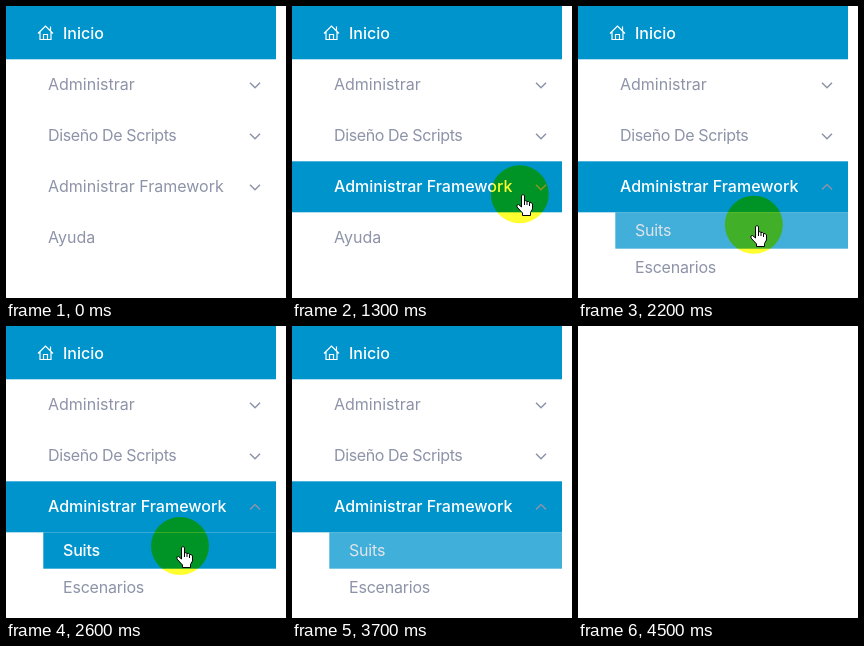
An HTML page that plays this animation: 280x292 px, repeating every 4600 ms.

```html
<!DOCTYPE html>
<html lang="es">
<head>
<meta charset="utf-8">
<style>
  html, body { margin: 0; width: 100%; height: 100%; overflow: hidden; background: #fff; }
  svg { display: block; width: 280px; height: 292px; }
  text { font: 16px Inter, "Open Sans", sans-serif; fill: #8d93a8; }
  .head { font-weight: 500; fill: #fff; }
  .tight { letter-spacing: -.38px; }
  #sub text { letter-spacing: -.2px; }
  .line { fill: none; stroke: #8d93a8; stroke-width: 1.5; }
  .blue { fill: #0094cd; }
  #spot { fill: #ffff30; mix-blend-mode: multiply; }
</style>
</head>
<body>
<svg viewBox="0 0 280 292" id="stage">
  <rect width="280" height="292" fill="#fff"/>
  <rect class="blue" width="270" height="53.3"/>
  <path d="M32 27.5L39.5 20L47 27.5M34 26V33.5H45V26M37.5 33.5V28.5H41.5V33.5M44.5 24.5V20.5" fill="none" stroke="#fff" stroke-width="1.2"/>
  <text class="head" x="57" y="33">Inicio</text>

  <text x="42" y="84">Administrar</text>
  <path class="line" d="M244 76.8l5 5l5-5"/>
  <text class="tight" x="42" y="135">Diseño De Scripts</text>
  <path class="line" d="M244 127.8l5 5l5-5"/>

  <rect class="blue" id="row" y="155.3" width="270" height="51"/>
  <text id="rowText" x="42" y="186">Administrar Framework</text>
  <path class="line" id="arrow"/>

  <text id="help" x="42" y="237">Ayuda</text>
  <g id="sub">
    <rect class="blue" id="item" x="37.3" y="206.3" width="232.7" height="36.4"/>
    <text id="itemText" x="57" y="230">Suits</text>
    <text x="57" y="267">Escenarios</text>
  </g>

  <circle id="spot" r="29"/>
  <g id="hand" fill="#fff" stroke="#000" stroke-linejoin="round">
    <path d="M5.5 1.5Q7-.5 8.5 1.5V7Q10 6 11 7.5Q12.5 6.8 13.5 8.5Q15.5 8 16.5 10V15L14.5 18.5V21.5H6.5V19L1 13Q0 10.5 2.5 10.5L5.5 13Z"/>
    <path d="M8.5 7v4M11 7.5v3.5M13.5 8.5v3.5" fill="none"/>
  </g>
</svg>
<script>
const $ = id => document.getElementById(id);
const LOOP = 4600, STEP = 100;

const ramp = (t, from, length) => Math.min(1, Math.max(0, (t - from) / length));
const smooth = p => p * p * (3 - 2 * p);
const easeOut = p => 1 - (1 - p) ** 2;

// To the menu row, down to its first entry, then away to the lower right
function pointer(t) {
  const toRow = easeOut(ramp(t, 1000, 600));
  const toItem = easeOut(ramp(t, 1800, 500));
  const away = easeOut(ramp(t, 3400, 200));
  return [
    251 - 31 * toRow - 46 * toItem + 92 * away,
    195 - 9 * toRow + 34 * toItem + 45 * away
  ];
}

const rowHover = t => smooth(ramp(t, 1000, 300));

// The fade out pauses shortly after it begins
const itemHover = t =>
  smooth(ramp(t, 2000, 300)) - .25 * ramp(t, 3600, 100) - .75 * ramp(t, 3800, 300);

function highlight(id, amount) {
  const mix = v => v + (255 - v) * amount;
  $(id).style.opacity = amount;
  const style = $(id + "Text").style;
  style.fill = `rgb(${mix(141)},${mix(147)},${mix(168)})`;
  style.fontWeight = amount > .95 ? 500 : 400;
}

const show = (id, on) => $(id).style.display = on ? "" : "none";
const move = (id, x, y) => $(id).setAttribute("transform", `translate(${x} ${y})`);

function draw(t) {
  const open = t >= 1600, visible = t >= 1000 && t < 3600;
  const [x, y] = pointer(t);
  highlight("row", rowHover(t));
  highlight("item", itemHover(t));
  $("arrow").setAttribute("d", open ? "M244 183.5l5-5l5 5" : "M244 178.8l5 5l5-5");
  show("help", !open);
  show("sub", open);
  show("spot", visible);
  show("hand", visible);
  move("spot", x, y);
  move("hand", Math.round(x - 4), Math.round(y));
  $("stage").style.opacity = 1 - ramp(t, 4300, 200);
}

const start = performance.now();
function tick() {
  const t = (performance.now() - start) % LOOP;
  draw(Math.floor(t / STEP) * STEP);
  requestAnimationFrame(tick);
}
tick();
</script>
</body>
</html>
```
